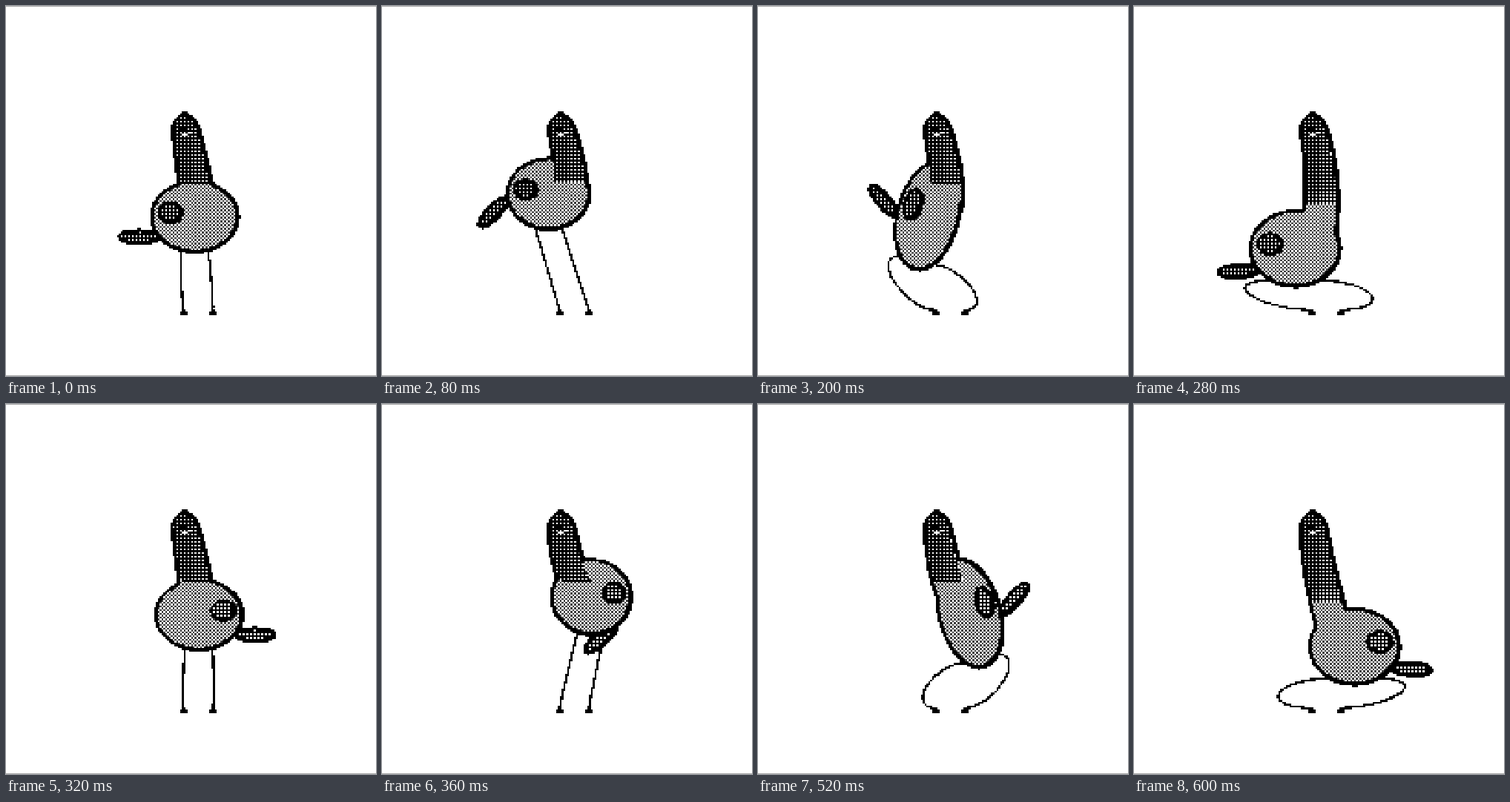
An HTML page with a canvas for the animation above (640 ms loop, 499 by 499 pixels).

```html
<!DOCTYPE html>
<html lang="en">
<head>
<meta charset="utf-8">
<title>Dancing bird</title>
<style>
html, body { margin: 0; width: 100%; height: 100%; overflow: hidden; background: #fff }
canvas { display: block }
</style>
</head>
<body>
<canvas id="stage" width="499" height="499"></canvas>
<script>
const SIZE = 499, GRID = 200, STEP = 40, HALF = 8;
const AXIS = 257, FLOOR = 412, BORDER = 4.5;
const stage = document.getElementById('stage').getContext('2d');
const makeContext = () => {
  const c = document.createElement('canvas');
  c.width = c.height = GRID;
  return c.getContext('2d', { willReadFrequently: true });
};
const mask = makeContext(), sheet = makeContext();
const pixels = sheet.createImageData(GRID, GRID);
mask.scale(GRID / SIZE, GRID / SIZE);
stage.imageSmoothingEnabled = false;

// Tones on the coarse grid
const black = () => 0, white = () => 255;
const checker = (x, y) => (x + y) % 2 ? 255 : 64;
const dots = (x, y) => x % 2 || y % 2 ? 0 : 255;

// Stamps whatever draw() covers onto the grid with hard edges.
function paint(tone, draw) {
  mask.clearRect(0, 0, SIZE, SIZE);
  mask.save();
  draw();
  mask.restore();
  const cover = mask.getImageData(0, 0, GRID, GRID).data;
  for (let i = 0; i < GRID * GRID; i++) {
    if (cover[i * 4 + 3] > 110) pixels.data.fill(tone(i % GRID, i / GRID | 0), i * 4, i * 4 + 3);
  }
}
const fill = (path, tone) => paint(tone, () => mask.fill(path));
const line = (path, tone, width) => paint(tone, () => {
  mask.lineWidth = width;
  mask.stroke(path);
});

// Merges the paths into one silhouette with a border, heavier on the lower right.
function shape(tone, ...paths) {
  paint(black, () => {
    mask.translate(.8, .5);
    mask.lineWidth = BORDER * 2 + 2;
    paths.forEach(p => mask.stroke(p));
  });
  paths.forEach(p => fill(p, tone));
}

function ellipse(x, y, rx, ry, turn = 0) {
  const path = new Path2D();
  path.ellipse(x, y, rx - BORDER, ry - BORDER, turn, 0, 7);
  return path;
}

// Half a dance, swinging left; the other half is its mirror image.
// Angles in degrees: root is the tail's place on the body, tail its direction, 0 being outward.
const keys = [
  { at: 0, swing: 3, y: 284, rx: 60, ry: 49, tilt: 0, root: 35, tail: 0 },
  { at: 1, swing: 25, y: 260, rx: 55, ry: 52, tilt: 0, root: 50, tail: 140 },
  { at: 2, swing: 33, y: 253, rx: 57, ry: 49, tilt: 0, root: 6, tail: 45 },
  { at: 3, swing: 29, y: 255, rx: 55, ry: 52, tilt: 0, root: -14, tail: 5 },
  { at: 5, swing: 28, y: 282, rx: 43, ry: 76, tilt: 15, root: 10, tail: -50 },
  { at: 6, swing: 40, y: 327, rx: 62, ry: 52, tilt: 0, root: 0, tail: -45 },
  { at: 7, swing: 40, y: 327, rx: 62, ry: 52, tilt: 0, root: 35, tail: 3 }
];

function poseAt(step) {
  const next = keys.findIndex(k => k.at >= step);
  const b = keys[next], a = keys[Math.max(0, next - 1)];
  const mix = a === b ? 0 : (step - a.at) / (b.at - a.at);
  return Object.fromEntries(Object.keys(a).map(k => [k, a[k] + (b[k] - a[k]) * mix]));
}

// Head and neck; the neck bends against the swing before it meets the body.
function neckPath(x, y) {
  const lean = x - AXIS, bend = 254 - lean * .14, base = 260 + lean * .3;
  const path = new Path2D();
  path.moveTo(240, 148);
  path.quadraticCurveTo(228, 155, 226, 165);
  path.quadraticCurveTo(bend - 20, 232, base - 21, y - 15);
  path.lineTo(base + 21, y - 15);
  path.quadraticCurveTo(bend + 20, 232, 256, 163);
  path.quadraticCurveTo(251, 153, 240, 148);
  path.closePath();
  return path;
}

// The lower the body, the further the legs bow outward.
function drawLegs({ rx, ry, y }, spot) {
  const bow = 1.6 * Math.max(0, 80 - (FLOOR - y - ry));
  const hip = Math.min(18 + bow * .3, rx / 2);
  for (const out of [-1, 1]) {
    const [hx, hy] = spot(out * hip, ry * Math.sqrt(1 - (hip / rx) ** 2) * .96);
    const foot = 259 + out * 20;
    const leg = new Path2D();
    leg.moveTo(hx, hy);
    leg.bezierCurveTo(hx + out * bow, hy, foot + out * bow, FLOOR - 4, foot, FLOOR - 2);
    line(leg, black, 2.8);
    fill(new Path2D(`M${foot - 5} 416v-4l4-3h4l-1 3h4v4z`), black);
  }
}

function drawFace() {
  fill(new Path2D('M240 141l-7 8h14z'), black);
  fill(ellipse(239, 166, 11, 8), black);
  line(new Path2D('M237 172q7 3 12-3'), white, 2.8);
}

function drawBird(step) {
  const side = step < HALF ? -1 : 1;
  const pose = poseAt(step % HALF);
  const { y, rx, ry } = pose;
  const [tilt, root, aim] = [-side * pose.tilt, pose.root, pose.tail].map(d => d * Math.PI / 180);
  const x = AXIS + side * pose.swing;
  const cos = Math.cos(tilt), sin = Math.sin(tilt);
  const spot = (u, v) => [x + u * cos - v * sin, y + u * sin + v * cos];

  pixels.data.fill(255);
  drawLegs(pose, spot);

  const reach = 28;
  const [tx, ty] = spot(side * rx * Math.cos(root) * .96, ry * Math.sin(root) * .96);
  shape(dots, ellipse(tx + side * reach * Math.cos(aim), ty + reach * Math.sin(aim), reach, 10, side * aim));

  const neck = neckPath(x, y);
  shape(checker, ellipse(x, y, rx, ry, tilt), neck);
  paint(dots, () => {
    mask.beginPath();
    mask.rect(0, 0, SIZE, Math.max(238, y - 60));
    mask.clip();
    mask.fill(neck);
  });
  shape(dots, ellipse(...spot(side * rx * .55, -ry * .12), rx * .29, ry * .29, tilt));
  drawFace();

  sheet.putImageData(pixels, 0, 0);
  stage.drawImage(sheet.canvas, 0, 0, SIZE, SIZE);
  stage.fillStyle = '#aaa';
  stage.fillRect(0, 0, SIZE, 1);
  stage.fillRect(0, SIZE - 1, SIZE, 1);
}

let shown = -1;
function tick() {
  const step = Math.floor(performance.now() / STEP) % (HALF * 2);
  if (step !== shown) drawBird(shown = step);
  requestAnimationFrame(tick);
}
tick();
</script>
</body>
</html>
```
